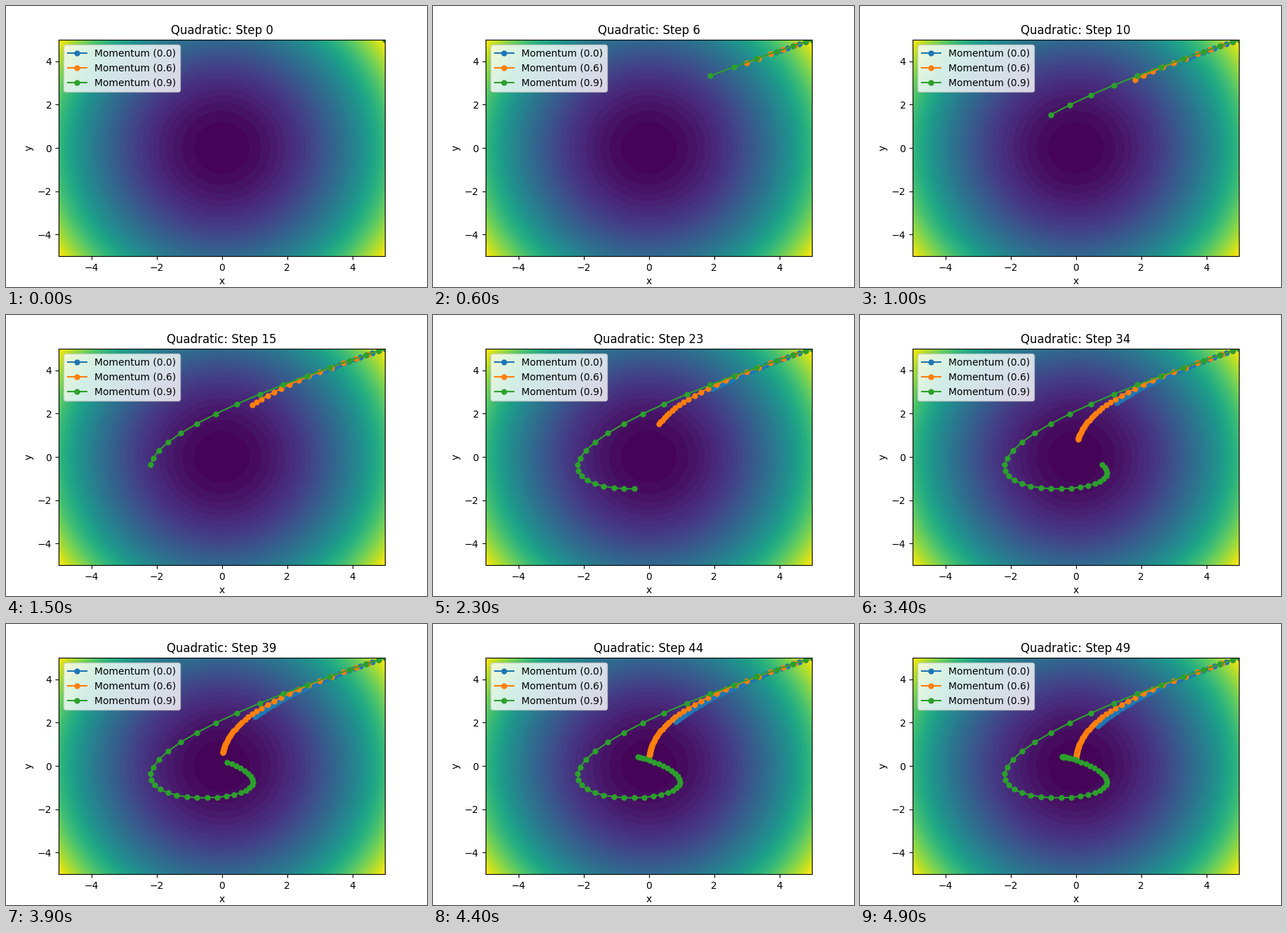
A matplotlib script for the animation above (5 s loop, 600 by 400 pixels).

```python
import matplotlib.pyplot as plt
import numpy as np
from matplotlib.animation import FuncAnimation

STEPS = 50
LEARNING_RATE = 0.01
START = (5.0, 5.0)
MOMENTA = (0.0, 0.6, 0.9)


def quadratic(x, y):
    return 2 * x**2 + y**2


def gradient(point):
    return np.array([4.0, 2.0]) * point


def descend(momentum):
    """Path of gradient descent with heavy-ball momentum."""
    point = np.array(START)
    velocity = np.zeros(2)
    path = [point]
    for _ in range(STEPS - 1):
        velocity = momentum * velocity + LEARNING_RATE * gradient(point)
        point = point - velocity
        path.append(point)
    return np.array(path)


fig, ax = plt.subplots(figsize=(6, 4), dpi=100)
axis = np.linspace(-5, 5, 100)
X, Y = np.meshgrid(axis, axis)
ax.contourf(X, Y, quadratic(X, Y), levels=50, cmap="viridis")
ax.set(xlim=(-5, 5), ylim=(-5, 5), xlabel="x", ylabel="y")
title = ax.set_title("Quadratic: Step 0")

paths = [descend(m) for m in MOMENTA]
lines = [ax.plot([], [], "o-", markersize=5, label=f"Momentum ({m})")[0]
         for m in MOMENTA]
ax.legend(loc="upper left")


def update(step):
    for line, path in zip(lines, paths):
        line.set_data(path[:step + 1, 0], path[:step + 1, 1])
    title.set_text(f"Quadratic: Step {step}")
    return [*lines, title]


anim = FuncAnimation(fig, update, frames=STEPS, interval=100,
                     repeat=True, repeat_delay=0, blit=False)
plt.show()
```
